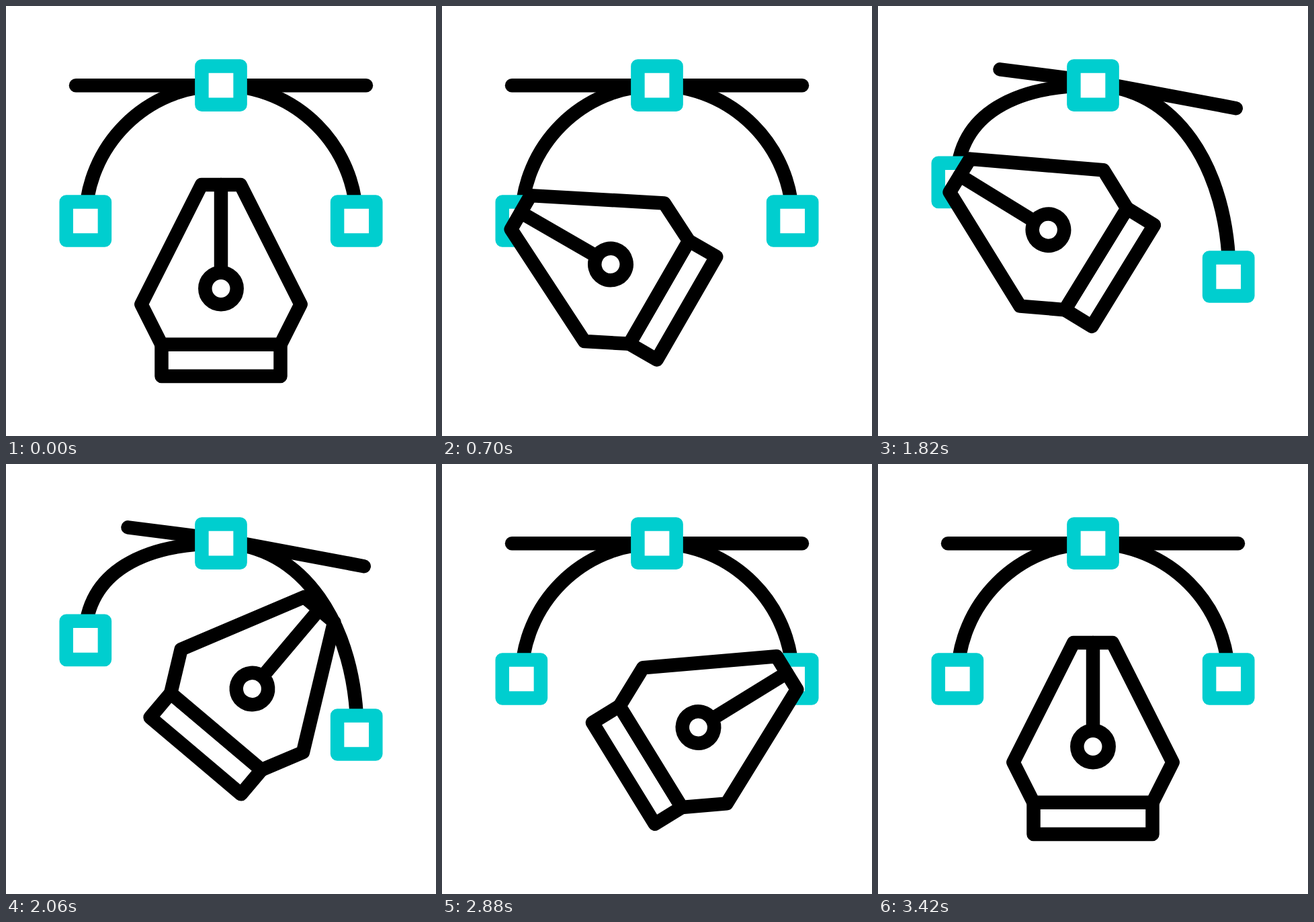
Recreate the animation shown at these times as an HTML page. Size 640x640 px, loop 3.6 s.

```html
<!DOCTYPE html>
<html lang="en">
<head>
<meta charset="utf-8">
<title>Pen tool</title>
<style>
  html, body { margin: 0; width: 100%; height: 100%; overflow: hidden; background: #fff; }
  svg { display: block; width: 100vw; height: 100vh; }
  svg * { stroke-width: 20.5; stroke-linecap: round; stroke-linejoin: round; }
  .ink { stroke: #000; fill: none; }
  .pen { stroke: #000; fill: #fff; }
  .node { stroke: #00cecf; fill: #fff; }
</style>
</head>
<body>
<svg viewBox="0 0 640 640">
  <defs><path id="box" d="M-28.6 -28.6h57.2v57.2h-57.2z"/></defs>
  <path id="arc" class="ink"/>
  <path id="bar" class="ink"/>
  <use id="left" class="node" href="#box" x="118.3"/>
  <use id="right" class="node" href="#box" x="521.7"/>
  <use class="node" href="#box" x="320" y="118.1"/>
  <g id="pen">
    <!-- moves the pivot, near the middle of the base, to the origin -->
    <g transform="translate(-314 -549.5)">
      <path class="pen" d="M231.5 503.8h177V551h-177z"/>
      <path class="pen" d="M291 266H349L438.7 444L408.5 503.8H231.5L201.3 444z"/>
      <path class="ink" d="M320 266V397"/>
      <circle class="pen" cx="320" cy="420.5" r="23.7"/>
    </g>
  </g>
</svg>
<script>
const LOOP = 3600, STEP = 20;

// pen pivot and angle, and how far the curve is bent
const home = { x: 314, y: 549.5, angle: 0, bend: 0 };
const atLeft = { x: 359.7, y: 454.2, angle: -60, bend: 0 };
const leftUp = { ...atLeft, x: 361.5, y: 405.4, bend: 1 };
const rightDown = { x: 244.1, y: 439.1, angle: 81.9, bend: 1 };
const atRight = { x: 268.4, y: 454.3, angle: 58.5, bend: 0 };

const moves = [
  { from: 0, to: 700, pose: atLeft },
  { from: 900, to: 1460, pose: leftUp },
  { from: 1780, to: 2240, pose: rightDown },
  { from: 2240, to: 2660, pose: atRight },
  { from: 2860, to: 3420, pose: home }
];

const $ = id => document.getElementById(id);
const mix = (a, b, p) => a + (b - a) * p;

// cubic-bezier(.5, 0, .5, 1), solved by bisection
function ease(u) {
  let lo = 0, hi = 1;
  for (let i = 0; i < 24; i++) {
    const s = (lo + hi) / 2;
    if (1.5 * s * (1 - s) + s ** 3 < u) lo = s; else hi = s;
  }
  return lo * lo * (3 - 2 * lo);
}

function poseAt(t) {
  let pose = home;
  for (const m of moves) {
    if (t <= m.from) break;
    const p = ease(Math.min(1, (t - m.from) / (m.to - m.from)));
    const next = {};
    for (const key in pose) next[key] = mix(pose[key], m.pose[key], p);
    pose = next;
  }
  return pose;
}

function drawCurve(k) {
  const top = 118.2, handle = 111.5;
  const ly = 320 - 57.6 * k, ry = 320 + 83 * k;
  $('left').setAttribute('y', ly);
  $('right').setAttribute('y', ry);
  $('arc').setAttribute('d',
    `M${118.3 - k} ${ly}c0 ${7.5 * k - handle} ${90.2 + k} ${top - ly} ${201.7 + k} ${top - ly}` +
    `C${320 + handle + 8 * k} ${top} ${521.7 + k} ${ry - handle - 53 * k} ${521.7 + k} ${ry}`);
  $('bar').setAttribute('d',
    `M${104 + 77.5 * k} ${top - 23.9 * k}L320 ${top - 6 * k}L${536 - 3.2 * k} ${top + 34 * k}`);
}

function draw(t) {
  const { x, y, angle, bend } = poseAt(t);
  $('pen').setAttribute('transform', `translate(${x} ${y}) rotate(${angle})`);
  drawCurve(bend);
}

const start = performance.now();
function tick() {
  const t = (performance.now() - start) % LOOP;
  draw(Math.floor(t / STEP) * STEP);
  requestAnimationFrame(tick);
}
tick();
</script>
</body>
</html>
```
